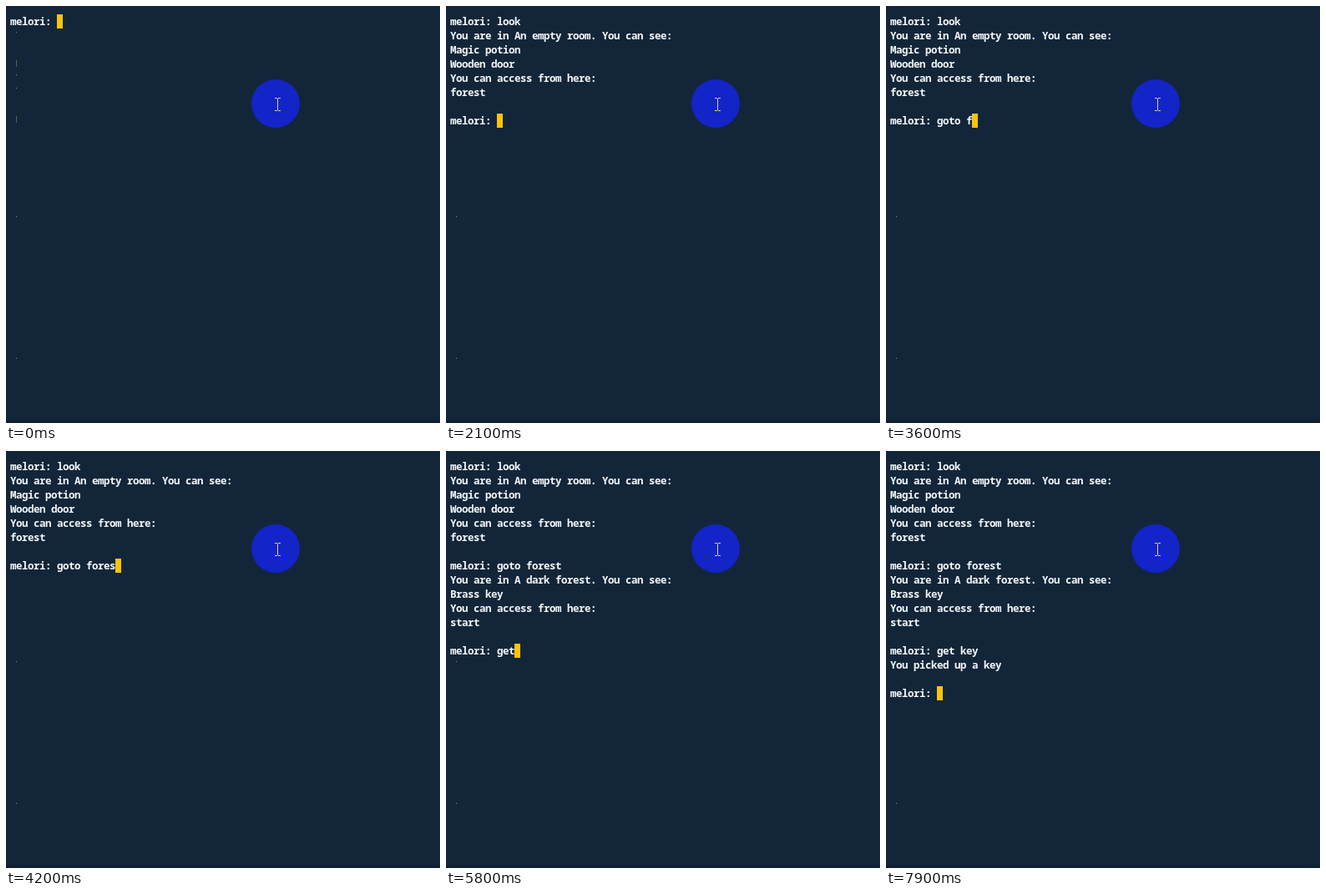
An HTML page with a canvas that plays this animation: 520x500 px, repeating every 8 s.

```html
<!DOCTYPE html>
<html lang="en">
<head>
<meta charset="utf-8">
<title>Text adventure</title>
<style>
html, body { margin: 0; width: 100%; height: 100%; overflow: hidden; background: #132639; }
canvas { display: block; }
</style>
</head>
<body>
<canvas id="stage" width="520" height="500"></canvas>
<script>
const ctx = document.getElementById('stage').getContext('2d');
const LOOP = 8000, LEFT = 5, TOP = 10, CELL = 7, ROW = 17;
const PROMPT = 'melori: ';

// Each command: key press times, the time of Enter, and the reply.
const commands = [
  { text: 'look', keys: [900, 1200, 1400, 1700], enter: 1900, reply: [
    'You are in An empty room. You can see:', 'Magic potion', 'Wooden door',
    'You can access from here:', 'forest', ''] },
  { text: 'goto forest',
    keys: [2600, 2800, 3000, 3200, 3400, 3500, 3700, 3900, 4000, 4200, 4400],
    enter: 4600, reply: [
    'You are in A dark forest. You can see:', 'Brass key',
    'You can access from here:', 'start', ''] },
  { text: 'get key', keys: [5400, 5600, 5800, 6100, 6400, 6600, 6800],
    enter: 7200, reply: ['You picked up a key', ''] }
];

// Faint marks left on the screen until a line is printed over them: y, height.
const specks = [[31, 1], [65, 8], [82, 1], [98, 1], [132, 8], [252, 1], [422, 1]];

function linesAt(time) {
  const lines = [];
  for (const { text, keys, enter, reply } of commands) {
    lines.push(PROMPT + text.slice(0, keys.filter(k => k <= time).length));
    if (time < enter) return lines;
    lines.push(...reply);
  }
  lines.push(PROMPT);
  return lines;
}

function rect(color, x, y, w, h) {
  ctx.fillStyle = color;
  ctx.fillRect(x, y, w, h);
}

function drawPointer() {
  ctx.fillStyle = '#1324c8';
  ctx.beginPath();
  ctx.arc(323, 117, 29, 0, Math.PI * 2);
  ctx.fill();
  const color = '#dcd38a';
  rect(color, 325, 111, 1, 14);
  for (const y of [110, 125]) {
    rect(color, 322, y, 3, 1);
    rect(color, 326, y, 3, 1);
  }
}

function draw(time) {
  const lines = linesAt(time);
  const last = lines.length - 1;
  rect('#132639', 0, 0, 520, 500);
  rect('#102033', 0, 496, 520, 4);

  const printedTo = TOP + lines.length * ROW;
  for (const [y, h] of specks) {
    if (y >= printedTo) rect(h > 1 ? '#56664a' : '#8a9270', 12, y, 1, h);
  }

  drawPointer();
  rect('#fac40a', LEFT + lines[last].length * CELL, TOP + last * ROW, CELL, ROW);

  ctx.font = '600 12.5px "Noto Sans Mono", "DejaVu Sans Mono", monospace';
  ctx.letterSpacing = '-0.5px';
  ctx.fillStyle = '#f4f7fa';
  lines.forEach((line, i) => ctx.fillText(line, LEFT, TOP + 13 + i * ROW));
}

function frame() {
  draw(performance.now() % LOOP);
  requestAnimationFrame(frame);
}
frame();
</script>
</body>
</html>
```
